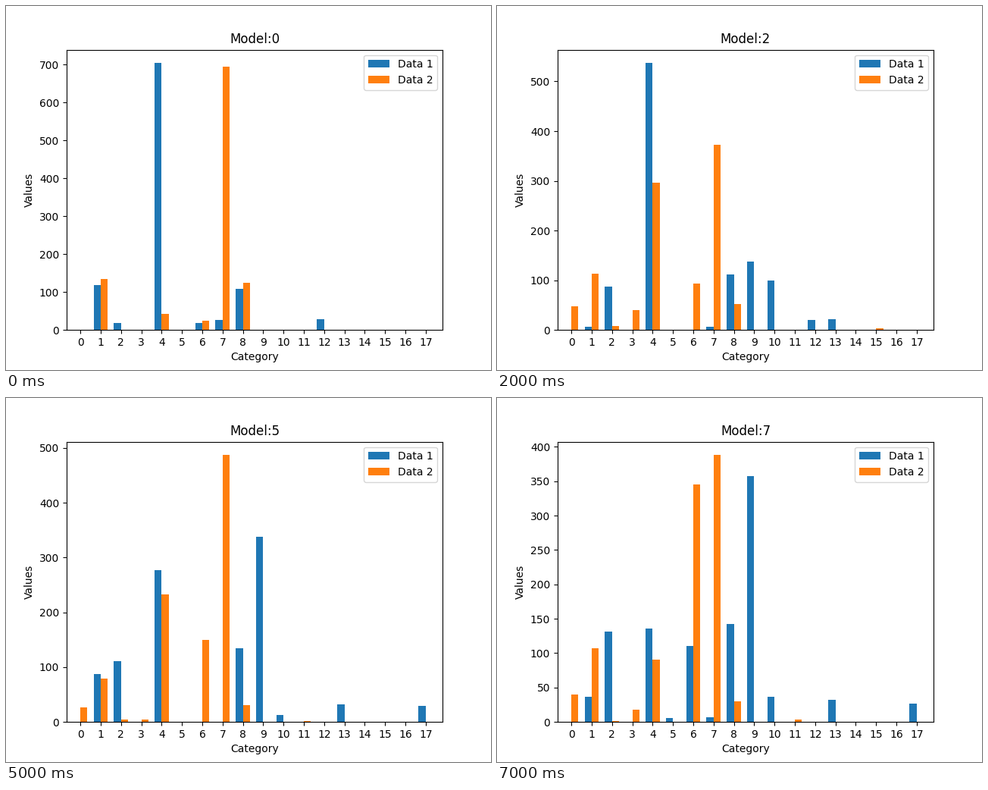
Animation, 640 px wide and 480 px high, one loop 8000 ms. Source, as a matplotlib script:

```python
import matplotlib.pyplot as plt
import numpy as np
from matplotlib.animation import FuncAnimation

CATEGORIES = np.arange(18)
BAR_WIDTH = 0.35
MODELS = 8
KEYS = (0, 1, 2, 3, 5, 7)


def path(*levels):
    """Straight lines through levels at the key models, then zero."""
    padded = levels + (0,) * (len(KEYS) - len(levels))
    return lambda t: np.interp(t, KEYS, padded)


# How the bar of each category changes with the model number.
DATA_1 = {
    1: path(118, 52, 6, 19, 87, 37),
    2: path(18, 33, 87, 50, 111, 131),
    4: path(704, 584, 537, 442, 277, 136),
    5: path(0, 8.5, 0, 0, 0, 5.5),
    6: path(18, 0, 0, 0, 0, 110),
    7: path(26, 60, 6, 0, 0, 7),
    8: path(108, 135, 112, 123, 134, 142),
    9: lambda t: 362 * (1 - np.exp(-0.475 * max(t - 1, 0) ** 1.25)),
    10: path(0, 108, 99, 114, 13, 37),
    12: lambda t: max(28 - 0.95 * t ** 3, 0),
    13: lambda t: min(11 * t, 32),
    17: path(0, 0, 0, 0, 29, 27),
}
DATA_2 = {
    0: path(0, 17, 47, 12, 26, 40),
    1: lambda t: 107 + 28 * np.cos(0.676 * t),
    2: path(0, 38, 8, 2, 4, 1),
    3: path(0, 0, 40, 5, 4, 18),
    4: path(42, 259, 296, 332, 233, 91),
    5: path(0, 0, 0, 9),
    6: path(24, 33, 93, 188, 150, 345),
    7: path(695, 360, 372, 342, 487, 388),
    8: lambda t: 30 + 94 * np.exp(-0.52 * t ** 1.5),
    9: path(0, 57),
    11: path(0, 40, 0, 12, 1, 3),
    12: path(0, 8),
    15: path(0, 0, 3),
}

fig, ax = plt.subplots(figsize=(6.4, 4.8), dpi=100)


def draw(model):
    ax.clear()
    tallest = 0
    for side, data, label in ((-1, DATA_1, "Data 1"), (1, DATA_2, "Data 2")):
        heights = [data[c](model) if c in data else 0 for c in CATEGORIES]
        ax.bar(CATEGORIES + side * BAR_WIDTH / 2, heights, BAR_WIDTH,
               label=label)
        tallest = max(tallest, *heights)
    ax.set_xlim(-0.675, 17.825)
    ax.set_ylim(0, 1.05 * tallest)
    ax.set_xticks(CATEGORIES)
    ax.set_xlabel("Category")
    ax.set_ylabel("Values")
    ax.set_title(f"Model:{model}")
    ax.legend(loc="upper right")
    return ax.patches


anim = FuncAnimation(fig, draw, frames=MODELS, init_func=lambda: draw(0),
                     interval=1000, repeat=True, repeat_delay=0)
plt.show()
```
